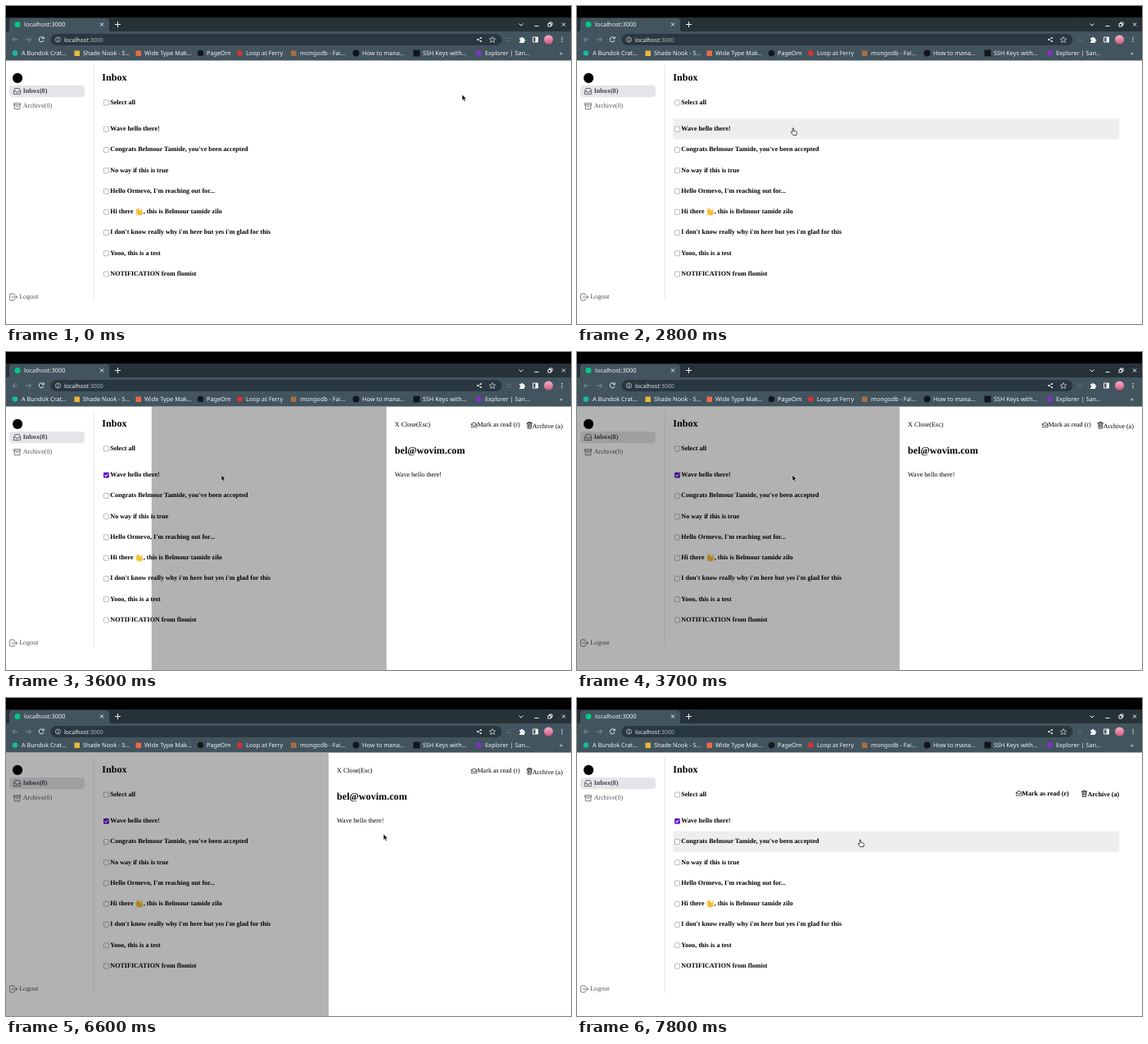
An HTML page for the animation above (8000 ms loop, 690x388 px).

```html
<!DOCTYPE html>
<html lang="en">
<head>
<meta charset="utf-8">
<title>Inbox</title>
<style>
html, body { margin: 0; width: 100%; height: 100%; overflow: hidden; background: #fff; }
#stage { position: relative; width: 690px; height: 388px; overflow: hidden; background: #fff; text-rendering: geometricPrecision; }
#browser, #pointer { position: absolute; left: 0; top: 0; width: 690px; height: 388px; }
#browser { height: 67px; }
#browser text { font: 7.3px "Noto Sans", "Open Sans", sans-serif; fill: #f1f4f5; }

/* The page is laid out at 1366 x 768 and scaled down to the stage */
#page { position: absolute; left: 0; top: 0; width: 1366px; height: 768px; overflow: hidden;
  transform: scale(.50512); transform-origin: 0 0; font: 16px/18px "Liberation Serif", "Times New Roman", serif; color: #000; }
#page > * { position: absolute; }
h2 { margin: 0; font-size: 24px; line-height: 28px; }
svg.ico { fill: none; stroke: currentColor; stroke-width: 1.5; stroke-linejoin: round; stroke-linecap: round; }

.mark { left: 16px; top: 162px; width: 24px; height: 24px; border-radius: 50%; background: #000; }
.nav { left: 8px; width: 182px; height: 28px; box-sizing: border-box; padding-left: 9px; border-radius: 8px;
  display: flex; align-items: center; gap: 4px; color: #52525b; }
.nav.on { background: #e5e5e9; color: #3f3f46; font-weight: bold; }
.line { left: 211px; top: 142px; width: 2px; height: 571px; background: #e8e8eb; }

.row { left: 232px; width: 1079px; height: 50px; display: flex; align-items: center; font-weight: bold; white-space: pre; }
.box { position: relative; flex: none; width: 13px; height: 13px; margin: 0 3px 0 4px; box-sizing: border-box;
  border: 1px solid #767676; border-radius: 2.5px; background: #fff; }
.tick { position: absolute; left: -1px; top: -1px; width: 13px; height: 13px; border-radius: 2.5px; background: #5b08cf; }
.tick path { fill: none; stroke: #fff; stroke-width: 2; }
.wave { width: 20px; height: 19px; }

.acts { display: flex; gap: 15px; }
.top.acts { right: 55px; top: 222px; gap: 30px; font-weight: bold; white-space: nowrap; }
.acts svg { width: 15px; height: 14px; vertical-align: -2px; }
.acts svg.bin { height: 18px; }

.shade { right: 0; top: 132px; height: 636px; background: rgba(0, 0, 0, .3); }
.panel { right: 0; top: 132px; height: 636px; box-sizing: border-box; padding: 36px 20px 0; background: #fff; }
.head { display: flex; justify-content: space-between; }
.panel h2 { margin: 35px 0 36px; }

.tick, .top, .hand, .shade, .panel { visibility: hidden; }
.tick, .top { animation: checked 8s step-end infinite; }
.shade { animation: shade 8s step-end infinite; }
.panel { animation: panel 8s step-end infinite; }
.first { animation: hover-first 8s step-end infinite; }
.second { animation: hover-second 8s step-end infinite; }
.arrow { animation: arrow 8s step-end infinite; }
.hand { animation: hand 8s step-end infinite; }
.cursor { animation: move 8s infinite; }

@keyframes checked { 0% { visibility: hidden } 37.5%, 100% { visibility: visible } }
@keyframes hover-first { 0%, 45% { background: transparent } 32.5% { background: #eeeeef } }
@keyframes hover-second { 0% { background: transparent } 96.25%, 100% { background: #eeeeef } }
@keyframes arrow { 0%, 45% { visibility: visible } 32.5%, 96.25%, 100% { visibility: hidden } }
@keyframes hand { 0%, 45% { visibility: hidden } 32.5%, 96.25%, 100% { visibility: visible } }
@keyframes shade {
  0%, 97.5%, 100% { visibility: hidden; width: 0 }
  42.5% { visibility: visible; width: 60px }
  43.75%, 96.25% { visibility: visible; width: 362px }
  45%, 95% { visibility: visible; width: 1014px }
  46.25% { visibility: visible; width: 1366px }
  93.75% { visibility: visible; width: 1310px }
}
@keyframes panel {
  0%, 97.5%, 100% { visibility: hidden; width: 0 }
  42.5% { visibility: visible; width: 40px }
  43.75%, 96.25% { visibility: visible; width: 184px }
  45%, 95% { visibility: visible; width: 446px }
  46.25% { visibility: visible; width: 586px }
  93.75% { visibility: visible; width: 564px }
}
/* The pointer is sampled ten times a second */
@keyframes move {
  0% { transform: translate(557px, 108px); animation-timing-function: step-end }
  12.5% { transform: translate(557px, 108px); animation-timing-function: steps(9) }
  23.75% { transform: translate(398px, 123px); animation-timing-function: step-end }
  27.5% { transform: translate(398px, 123px); animation-timing-function: steps(6) }
  35% { transform: translate(263px, 150px); animation-timing-function: step-end }
  48.75% { transform: translate(263px, 150px); animation-timing-function: steps(9) }
  60% { transform: translate(445px, 112px); animation-timing-function: steps(2) }
  62.5% { transform: translate(448px, 114px); animation-timing-function: steps(4) }
  67.5% { transform: translate(430px, 137px); animation-timing-function: step-end }
  73.75% { transform: translate(430px, 137px); animation-timing-function: steps(7) }
  82.5% { transform: translate(461px, 166px); animation-timing-function: step-end }
  83.75% { transform: translate(461px, 166px); animation-timing-function: steps(4) }
  88.75%, 100% { transform: translate(345px, 174px); animation-timing-function: step-end }
}
</style>
</head>
<body>
<div id="stage">
  <div id="page">
    <div class="mark"></div>
    <div class="nav on" style="top:192px">
      <svg class="ico" width="20" height="20"><path d="M2 10 5 3h10l3 7v7H2zM2 10h5l1 3h4l1-3h5"/></svg>Inbox(8)</div>
    <div class="nav" style="top:228px">
      <svg class="ico" width="20" height="20"><path d="M2 3h16v4H2zM3.5 7v10h13V7M8 11h4"/></svg>Archive(0)</div>
    <div class="nav" style="top:689px;left:0;padding-left:8px">
      <svg class="ico" width="20" height="20"><path d="M12 5V4a2 2 0 0 0-2-2H4a3 3 0 0 0-3 3v10a3 3 0 0 0 3 3h6a2 2 0 0 0 2-2v-1M6 10h13m-4-4 4 4-4 4"/></svg>Logout</div>
    <div class="line"></div>

    <h2 style="left:232px;top:160px">Inbox</h2>
    <div class="row" style="top:208px"><i class="box"></i>Select all</div>
    <div class="top acts">
      <div><svg class="ico" viewBox="0 0 15 14"><path d="M1 5.5 7.5 1 14 5.5V13H1zM1 5.5l6.5 4 6.5-4"/></svg>Mark as read (r)</div>
      <div><svg class="ico bin" viewBox="0 0 15 18"><path d="M1 4h13M5 4V1.5h5V4M2.5 4l1 12.500h8l1-12.500M6 7v6m3-6v6"/></svg>Archive (a)</div>
    </div>
    <div class="row first" style="top:272px"><i class="box"><svg class="tick" viewBox="0 0 13 13"><path d="M2.500 6.500 5.300 9.300 10.500 3.500"/></svg></i>Wave hello there!</div>
    <div class="row second" style="top:322px"><i class="box"></i>Congrats Belmour Tamide, you've been accepted</div>
    <div class="row" style="top:372px"><i class="box"></i>No way if this is true</div>
    <div class="row" style="top:422px"><i class="box"></i>Hello Ormevo, I'm reaching out for...</div>
    <div class="row" style="top:472px"><i class="box"></i>Hi there <svg class="wave" viewBox="0 0 20 19"><path d="M4 3.500 11 11M7.500 2l6 7.500M3 7.500l6.500 6M4 12l5 4M16 5.500v7" stroke="#f7bd2b" stroke-width="3" stroke-linecap="round"/><ellipse cx="12.500" cy="12.500" rx="5" ry="5.500" fill="#f7bd2b"/><path d="M1 14q1 3 4 4M14 1q3 0 4 3" fill="none" stroke="#b9a06a"/></svg>, this is Belmour tamide zilo</div>
    <div class="row" style="top:522px"><i class="box"></i>I don't know really why i'm here but yes i'm glad for this</div>
    <div class="row" style="top:572px"><i class="box"></i>Yooo, this is a test</div>
    <div class="row" style="top:622px"><i class="box"></i>NOTIFICATION from flomist</div>

    <div class="shade"></div>
    <div class="panel">
      <div class="head">
        <div>X Close(Esc)</div>
        <div class="acts">
          <div><svg class="ico" viewBox="0 0 15 14"><path d="M1 5.500 7.500 1 14 5.500V13H1zM1 5.500l6.500 4 6.500-4"/></svg>Mark as read (r)</div>
          <div><svg class="ico bin" viewBox="0 0 15 18"><path d="M1 4h13M5 4V1.500h5V4M2.500 4l1 12.500h8l1-12.500M6 7v6m3-6v6"/></svg>Archive (a)</div>
        </div>
      </div>
      <h2>bel@wovim.com</h2>
      <div>Wave hello there!</div>
    </div>
  </div>

  <svg id="browser" viewBox="0 0 690 67">
    <defs><linearGradient id="face" x2="0" y2="1"><stop stop-color="#f0b6c6"/><stop offset="1" stop-color="#d2557c"/></linearGradient></defs>
    <path fill="#000" d="M0 0h690v14H0z"/>
    <path fill="#263238" d="M0 14h690v18H0z"/>
    <path fill="#42545e" d="M0 31h2q2 0 2-2V19q0-4 4-4h114q4 0 4 4v10q0 2 2 2h562v35.500H0z"/>
    <rect x="54.500" y="34" width="551" height="14" rx="7" fill="#293840"/>
    <circle cx="14" cy="22.500" r="3.500" fill="#00c985"/>
    <text x="22" y="25.200" style="font-size:7.450px">localhost:3000</text>
    <text x="71" y="43.600" style="font-size:7.050px">localhost<tspan fill="#a9b4ba">:3000</tspan></text>

    <g fill="none" stroke="#eef2f3" stroke-width="1">
      <path d="m115 20.500 4 4m0-4-4 4M133 22.500h7m-3.500-3.500v7M626.500 21.500l2.500 2.500 2.500-2.500M645.500 24.500h5M662 21.500h3.500V25H662zM663.500 21.500V20h3.500v3.500h-1.500M679 20.500l4 4m0-4-4 4"/>
      <path stroke="#80909a" d="M14.500 41h-6.500m3-3-3 3 3 3M24 41h6.500m-3-3 3 3-3 3"/>
      <path d="M45.700 39a3 3 0 1 0 .4 2.800M46.200 37.500v2.200H44"/>
      <g stroke="#c9d1d5" stroke-width=".8">
        <circle cx="63.500" cy="41" r="3"/><path d="M63.500 40.500V43m0-3.800v.8M580 39l-4 2 4 2"/>
        <path d="m594 37.500 1.100 2.400 2.600.2-2 1.700.7 2.600-2.400-1.400-2.400 1.400.7-2.600-2-1.700 2.600-.2z"/>
      </g>
      <path stroke="#5a6c76" d="M611 39.500h6m-6 3h6"/>
      <path d="M643.500 38h6v6h-6z"/>
    </g>
    <g fill="#eef2f3">
      <circle cx="580" cy="39" r="1"/><circle cx="576" cy="41" r="1"/><circle cx="580" cy="43" r="1"/>
      <path d="M627 39h1.800a1.200 1.200 0 0 1 2.400 0h1.800v1.700a1.200 1.200 0 0 1 0 2.400V45h-6v-1.800a1.200 1.200 0 0 0 0-2.400zM646.500 38h3v6h-3z"/>
      <circle cx="679" cy="38.500" r=".75"/><circle cx="679" cy="41" r=".75"/><circle cx="679" cy="43.500" r=".75"/>
    </g>
    <circle cx="662.500" cy="41" r="5.500" fill="url(#face)"/>

    <circle cx="11" cy="57.500" r="3.300" fill="#18b9a0"/><text x="19" y="60">A Bundok Crat…</text>
    <rect x="83.500" y="54.500" width="6.500" height="6.500" fill="#e9b93c"/><text x="94" y="60">Shade Nook - S…</text>
    <rect x="158.500" y="54.500" width="6.500" height="6.500" fill="#ef6a45"/><text x="169" y="60">Wide Type Mak…</text>
    <circle cx="237.500" cy="57.500" r="3.800" fill="#14191c"/><text x="245" y="60">PageOm</text>
    <circle cx="285.500" cy="57.500" r="3.300" fill="#d8332f"/><text x="293" y="60">Loop at Ferry</text>
    <rect x="348" y="54.500" width="6.500" height="6.500" fill="#a86f43"/><text x="359" y="60">mongodb - Fai…</text>
    <circle cx="427.500" cy="57.500" r="4" fill="#11161d"/><text x="435" y="60">How to mana…</text>
    <rect x="497.500" y="53.500" width="8" height="8" fill="#11161d"/><text x="509" y="60">SSH Keys with…</text>
    <circle cx="577.500" cy="57.500" r="3.500" fill="#7d35bd"/><text x="585" y="60">Explorer | San…</text>
    <text x="676" y="60">»</text>
  </svg>

  <svg id="pointer" viewBox="0 0 690 388">
    <g class="cursor">
      <path class="arrow" d="M0 0v7.300l1.700-1.500 1.200 2.700 1.300-.6L3 5.300h2.300z" fill="#111" stroke="#fff" stroke-width=".5"/>
      <path class="hand" d="M.2-.9q.8-.6 1.400.2v3l3 .7q1 .3 .9 1.400L5 7.500H.8L-1.600 4.500q-.3-.9.700-1L.2 4.200z" fill="#fff" stroke="#222" stroke-width=".8" stroke-linejoin="round"/>
    </g>
  </svg>
</div>
</body>
</html>
```
